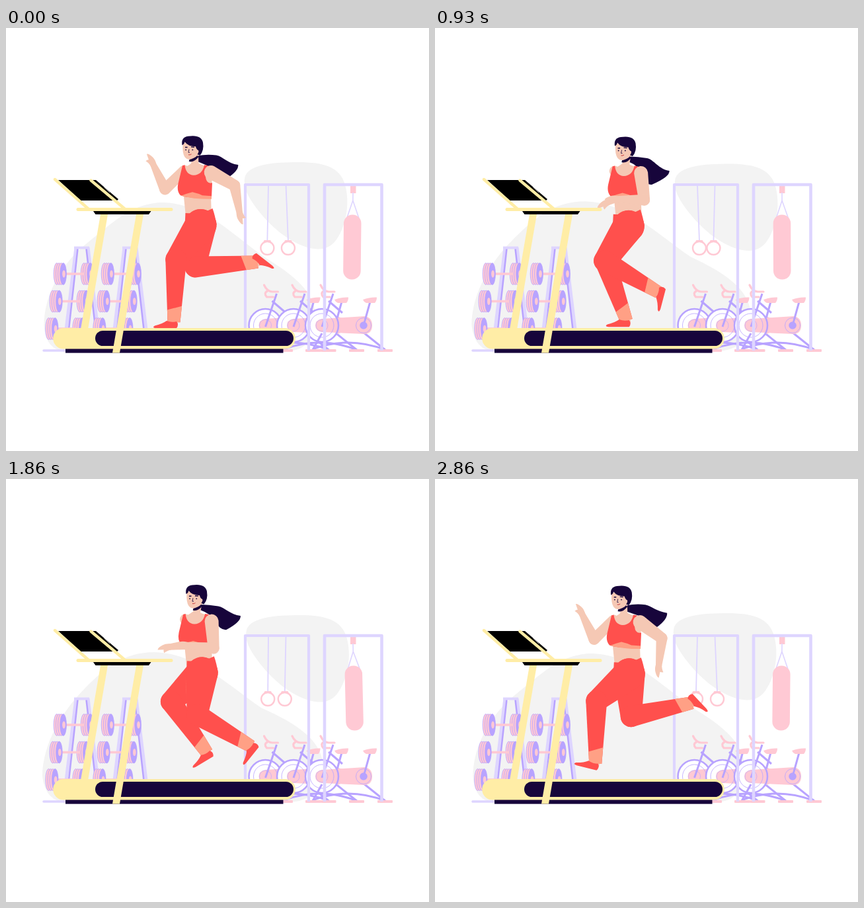
Write an HTML page that moves like this. It is 640 px wide and 640 px high and loops after 2930 ms.

```html
<!DOCTYPE html>
<html lang="en">
<head>
<meta charset="utf-8">
<title>Treadmill run</title>
<style>
html, body { margin: 0; width: 100%; height: 100%; overflow: hidden; background: #fff; }
svg { display: block; width: 100vw; height: 100vh; }
</style>
</head>
<body>
<svg id="stage" viewBox="0 0 640 640"></svg>
<script>
const LOOP = 2930, STEPS = 41, STRIDE = LOOP / 2;
const RED = '#ff504d', PEACH = '#ffa085', SKIN = '#f5c8b4', NAVY = '#17053b', PINK = '#ffc9d4',
  VIOLET = '#b8a3ff', LILAC = '#ded5ff', CREAM = '#ffeda6', GREY = '#f3f3f3';
const { sin, cos, acos, atan2, hypot, max, min, PI } = Math;
const stage = document.getElementById('stage');

// ---------- markup helpers ----------
const path = (d, fill, extra = '') => `<path d="${d}" fill="${fill}" ${extra}/>`;
const line = (d, color, w, cap = 'butt') =>
  `<path d="${d}" fill="none" stroke="${color}" stroke-width="${w}" stroke-linecap="${cap}" stroke-linejoin="round"/>`;
const rect = (x, y, w, h, r, fill) => `<rect x="${x}" y="${y}" width="${w}" height="${h}" rx="${r}" fill="${fill}"/>`;
const ring = (x, y, r, color, w) => `<circle cx="${x}" cy="${y}" r="${r}" fill="none" stroke="${color}" stroke-width="${w}"/>`;
const dot = (x, y, r, fill) => `<circle cx="${x}" cy="${y}" r="${r}" fill="${fill}"/>`;

// ---------- scenery ----------
function rackFrame(x) {
  return line(`M${x + 3} 332L${x - 12} 456M${x + 21} 332L${x + 36} 456`, LILAC, 5) +
    line(`M${x + 5.5} 334L${x - 8} 456M${x + 18.5} 334L${x + 32.5} 456`, VIOLET, 2.5) +
    line(`M${x} 332.5H${x + 23}`, LILAC, 4);
}
function plates(x, y) {
  let s = '';
  for (let i = 0; i < 4; i++) {
    s += `<ellipse cx="${x + 5 + i * 3.2}" cy="${y}" rx="4.8" ry="16.5" fill="${i < 3 ? PINK : VIOLET}" stroke="${VIOLET}" stroke-width=".8"/>`;
  }
  return s + `<ellipse cx="${x + 15.5}" cy="${y}" rx="2.3" ry="5.5" fill="${PINK}"/>`;
}
function dumbbell(x, y) {
  return plates(x + 41, y) + line(`M${x + 16} ${y}H${x + 46}`, PINK, 3.6) + plates(x, y);
}
function bike(x) {
  return `<g transform="translate(${x})">` +
    dot(478, 450, 24.5, '#fff') +
    line('M464 487L478 462M540 460L575 488M466 485Q520 466 574 487', VIOLET, 3) +
    path('M478 440L543 436Q554 438 554 450Q554 462 543 463L478 460Q468 458 468 450Q468 442 478 440Z', PINK) +
    ring(478, 450, 25, VIOLET, 2.6) + ring(478, 450, 18, VIOLET, .8) + ring(478, 450, 9, VIOLET, .6) +
    line('M495 402L478 452M488 413L509 431M541 450L551 414', VIOLET, 3) +
    path('M540 411Q550 407 561 407.5Q561 413 558 416H545Q541 414 540 411Z', PINK) +
    line('M476 389Q480 398 488 399H497M490 407H480Q475 401 481 398', PINK, 3.2, 'round') +
    ring(541, 450, 11.5, VIOLET, .8) + dot(541, 450, 5.8, VIOLET) +
    rect(453, 486, 24, 4, 1, PINK) + rect(562, 486, 23, 4, 1, PINK) + '</g>';
}
function scenery() {
  let weights = '';
  for (let row = 0; row < 3; row++) {
    for (const x of [72, 144]) weights += dumbbell(x - row * 6.2, 372 + row * 41.5);
  }
  return path('', GREY, 'id="hill"') +
    path('M361 228C364 206 405 203 443 203C488 203 506 214 513 237C521 266 514 300 500 320C490 335 474 337 456 332C425 322 401 300 384 279C367 258 359 243 361 228Z', GREY, 'id="cloud"') +
    line('M57 488H92', LILAC, 3.5, 'round') + rackFrame(103) + rackFrame(176) + weights +
    bike(-85.5) + bike(-43) + bike(0) +
    line('M362 488V237H458V488', LILAC, 4.2) + '<g id="ringA"></g><g id="ringB"></g>' +
    rect(521, 238, 8.5, 12, 0, PINK) +
    '<g id="bag">' + line('M525 249V261L515 291M525 261L535.5 291', LILAC, 1.6) +
    rect(511.5, 282.5, 26.5, 98, 13, PINK) + '</g>' +
    line('M482 488V237H568.5V488', LILAC, 4.6);
}
function treadmill() {
  return path('M132 277H219.5L216 282H135.5Z', '#000') +
    path('M79 230H136L170 259L168 261H113Z', '#000') +
    line('M148.5 241L157 249', '#fff', .7) +
    line('M74 229L125 274M128.5 230.5L179 273', CREAM, 4.4, 'round') +
    line('M109 274.5H250', CREAM, 5, 'round') +
    path('M143 282H154L124 456H113Z', CREAM) +
    rect(90, 485, 329.5, 6.6, 0, NAVY) +
    path('M87 454H422A15.7 15.7 0 0 1 422 485.5H87A15.7 15.7 0 0 1 87 454Z', CREAM) +
    rect(135, 458, 300, 23, 11.5, NAVY) +
    path('M197 282H208L172 491.5H161Z', CREAM);
}
const HEAD = line('M277 200Q283 202 289 194', NAVY, 5) +
  path('M267 176Q266 190 270 196Q274 201 280 199Q288 196 289 193Q295 193 295 187Q292 172 280 169Z', SKIN) +
  path('M266 178Q264 166 275 164.5Q295 161.5 297.5 174Q299.5 186 293 193.5L289 192Q293 186 289 185Q287 183 286.5 180Q275 180 270 173Q269 177 266 178Z', NAVY) +
  line('M270.5 181.2H274M279.5 180.6L284.5 181', NAVY, 1.4) +
  dot(271.6, 185, .9, NAVY) + dot(281.8, 185, .9, NAVY) +
  line('M276.5 184L275.5 189H277.5', NAVY, .8) + line('M275.5 192.5Q278 193 280 191.5', '#c8393c', 1);
const BODY = path('M266 213Q275 210 281 205H291Q297 209 306 210Q312 214 312 226L310 256L311 285Q290 292 272 286L269 256L262 240Z', SKIN);
const TOP = path('M267 209L260.5 236Q258 248 264 254Q278 259 311 257.5L312 235Q303 237 302 226Q301 215 306 209L300 208Q297 223 284 223.5Q272 223 270.5 208Z', RED) +
  path('M265 254.5Q274 251 282 249Q291 251 297 254L311 255V259.5Q285 260 265 254.5Z', PEACH);
const SHOE = 'M4 -1Q8 4 4 9.3L-27 9.3Q-34 8.5 -29 5.5Q-18 3 -11 -2Q-4 1 4 -1Z';
const HAND = 'M-3 -4.5Q4 -5 8 -8Q9 -5 8 -3L17 -2Q17 1 9 4Q4 6 -3 4.5Z';

// ---------- runner parts, back to front ----------
const part = (id, fill) => path('', fill, `id="${id}"`);
const legParts = k => part(k + 'Thigh', RED) + part(k + 'Shin', RED) + `<circle id="${k}Ankle" r="6.3" fill="${SKIN}"/>` +
  part(k + 'Cuff', PEACH) + path(SHOE, RED, `id="${k}Shoe"`);
const armParts = k => part(k + 'Upper', SKIN) + part(k + 'Fore', SKIN) + path(HAND, SKIN, `id="${k}Hand"`);
stage.innerHTML = scenery() + part('tail', NAVY) + armParts('far') +
  `<path id="neck" stroke="${SKIN}" stroke-width="11"/>` + `<g id="body">${BODY}</g>` +
  legParts('far') + part('foldFar', PEACH) + part('waist', RED) + legParts('near') + part('foldNear', PEACH) +
  `<g id="top">${TOP}</g><g id="head">${HEAD}</g>` + armParts('near') + treadmill();

const el = {};
stage.querySelectorAll('[id]').forEach(n => el[n.id] = n);
const set = (id, name, v) => el[id].setAttribute(name, v);

// ---------- rhythm ----------
const angle = p => 2 * PI * p / STRIDE;
const bob = (p, low) => cos(2 * angle(p - low));             // two bounces per stride
const bump = (p, peak) => max(0, cos(angle(p - peak))) ** 10; // one short swell per stride

// Path of one foot from landing: time, ankle x, ankle y, shoe turn
const STEP = [
  [0, 254, 445, 0], [138, 290, 443, 0], [313, 311, 432, -12], [395, 372, 404, -52], [570, 390, 339, -123],
  [672, 381, 354, -142], [930, 338, 400, -75], [1105, 290, 417, -17], [1243, 212, 417, 33], [1395, 243, 431, 14]
];
const FAR_LAG = STRIDE / 2 + 60;
// smooth closed curve through the keys
function footAt(time) {
  const p = (time % STRIDE + STRIDE) % STRIDE, n = STEP.length;
  const key = i => STEP[(i + n) % n];
  const at = i => key(i)[0] + Math.floor(i / n) * STRIDE;
  let i = n - 1;
  while (STEP[i][0] > p) i--;
  const h = at(i + 1) - at(i), u = (p - at(i)) / h, w = 1 - u;
  return [1, 2, 3].map(a => {
    const slope = j => (key(j + 1)[a] - key(j - 1)[a]) / (at(j + 1) - at(j - 1));
    return key(i)[a] * (1 + 2 * u) * w * w + slope(i) * h * u * w * w +
      key(i + 1)[a] * u * u * (3 - 2 * u) - slope(i + 1) * h * u * u * w;
  });
}

// ---------- geometry ----------
const fix = (...a) => a.map(n => n.toFixed(2)).join(' ');
const add = (a, x, y) => [a[0] + x, a[1] + y];
const polar = (a, r, turn) => add(a, r * cos(turn), r * sin(turn));
// middle joint of a two-bone limb; side +1 bends like a knee, -1 like an elbow
function joint(a, b, la, lb, side) {
  const dx = b[0] - a[0], dy = b[1] - a[1], d = hypot(dx, dy);
  const c = (la * la + d * d - lb * lb) / (2 * la * d);
  return polar(a, la, atan2(dy, dx) + side * acos(max(-1, min(1, c))));
}
// point at share u along a-b, offset sideways by r
function beside(a, b, u, r) {
  const dx = b[0] - a[0], dy = b[1] - a[1], l = hypot(dx, dy) || 1;
  return [a[0] + dx * u - dy / l * r, a[1] + dy * u + dx / l * r];
}
function taper(a, b, r, s, flat) {
  const at = (u, k) => fix(...beside(a, b, u, k));
  const end = flat ? 'L' : `A${s} ${s} 0 0 0 `;
  return `M${at(0, r)}L${at(1, s)}${end}${at(1, -s)}L${at(0, -r)}A${r} ${r} 0 0 0 ${at(0, r)}Z`;
}
const lens = (a, b, w) => w < .3 ? '' : `M${fix(...a)}L${fix(...b)}Q${fix(...beside(a, b, .5, w))} ${fix(...a)}Z`;

// ---------- runner ----------
function drawLeg(k, p, hip) {
  const [x, y, turn] = footAt(p), ankle = [x, y], knee = joint(hip, ankle, 64, 95, 1);
  const at = (u, side) => fix(...beside(knee, ankle, u, side * (16 - 6.5 * u)));
  set(k + 'Thigh', 'd', taper(hip, knee, 24, 16));
  set(k + 'Shin', 'd', taper(knee, ankle, 16, 9.5, true));
  set(k + 'Cuff', 'd', `M${at(.81, 1)}L${at(1, 1)}L${at(1, -1)}L${at(.74, -1)}Z`);
  set(k + 'Ankle', 'cx', x);
  set(k + 'Ankle', 'cy', y);
  const heel = max(0, -turn / 24);
  set(k + 'Shoe', 'transform', `translate(${fix(x, y)}) rotate(${fix(turn)}) translate(${fix(heel)} 0)`);
  return knee;
}
function drawArm(k, shoulder, reach, degrees, r) {
  const wrist = polar(shoulder, reach, degrees * PI / 180), elbow = joint(shoulder, wrist, 41, 43, -1);
  const turn = atan2(wrist[1] - elbow[1], wrist[0] - elbow[0]) * 180 / PI;
  set(k + 'Upper', 'd', taper(shoulder, elbow, r, 8.5));
  set(k + 'Fore', 'd', taper(elbow, wrist, 8.5, 4.5));
  set(k + 'Hand', 'transform', `translate(${fix(...wrist)}) rotate(${fix(turn)})`);
}
function drawTail(p, head) {
  const sway = bob(p, 197), root = add(head, 289, 194), base = add(head, 287, 202);
  const crest = [318 + head[0] * .5, 193 + sway * 4];
  const tip = [351 + head[0] * .6, 208 + sway * 8];
  const end = [333 - sway * 5, tip[1] + 21];
  set('tail', 'd', `M${fix(...root)}Q${fix(crest[0] - 14, crest[1] - 2, ...crest)}` +
    `C${fix(crest[0] + 10, crest[1] + 2, tip[0] - 16, tip[1] - 2, ...tip)}` +
    `Q${fix(tip[0] + 1, tip[1] + 9, ...end)}Q${fix(end[0] - 10, end[1] + 1, end[0] - 17, end[1] - 13)}` +
    `Q${fix(base[0] + 17, base[1] + 6, ...base)}Z`);
}
function drawRunner(p) {
  const c = cos(angle(p)), s = sin(angle(p)), drop = 3 * bob(p, 130) - 2;
  const hip = [294.5 + 2.3 * s, 299 + 1.5 * drop];
  const body = [1 - c, drop], head = [4.5 - 4 * c + 1.5 * s, drop];
  const shift = v => `translate(${fix(...v)})`;
  set('body', 'transform', shift(body));
  set('top', 'transform', shift(body));
  set('head', 'transform', shift(head));
  set('neck', 'd', `M${fix(286 + body[0], 213 + body[1])}L${fix(285 + head[0], 190 + head[1])}`);
  const pt = (dx, dy) => fix(...add(hip, dx, dy));
  set('waist', 'd', `M${pt(-23, -18)}Q${pt(2, -16)} ${pt(18, -25)}Q${pt(22, -14)} ${pt(24, 0)}L${pt(-24, 2)}Z`);

  drawLeg('far', p - FAR_LAG, hip);
  const knee = drawLeg('near', p, hip);
  set('foldNear', 'd', lens(add(hip, 16, 18), add(knee, 14, 10), -7 * bump(p, 1330)));
  set('foldFar', 'd', lens(add(hip, -25, 5), add(hip, -23, 46), 8 * bump(p, 570)));

  const nearSwing = 118 - 63 * c + 8 * s - 20 * sin(2 * angle(p));
  drawArm('near', add(body, 310, 219), 76 - .27 * (nearSwing - 55), nearSwing, 10.5);
  drawArm('far', add(body, 270, 216), 49, 135 + 57 * c - 8 * s, 8);
  drawTail(p, head);
}

// ---------- slow background sway ----------
const wave = (t, peak) => cos(2 * PI * (t - peak) / LOOP);
function drawRing(id, top, x) {
  el[id].innerHTML = line(`M${top} 238L${fix(x)} 322`, LILAC, 1.8) + ring(fix(x), 333, 10, PINK, 2.4) +
    line(`M${fix(x - 4)} 322.5H${fix(x + 4)}`, PINK, 3, 'round');
}
function drawSway(t) {
  const w = (1 - wave(t, 0)) / 2;
  const left = 57.5 - 3 * w, crest = 238 - 16 * w, top = 264 - 2.5 * w, right = 468 + 14 * w;
  set('hill', 'd', `M${fix(left, 450)}C${fix(left, 400, left + 31, 352, 122 - 10 * w, 326 - 4 * w)}` +
    `C${fix(crest - 78, 296 - 10 * w, crest - 48, top, crest, top)}` +
    `C${fix(crest + 62, top + 2, crest + 104, 312 - 7 * w, 390 - 5 * w, 346)}` +
    `C${fix(right - 38, 371, right - 5, 394, right, 430)}Q${fix(right + 2, 488, 425, 489)}H92Q60 489 ${fix(left, 450)}Z`);
  set('cloud', 'transform', `translate(${fix(3 * w, 3.5 * w)})`);
  drawRing('ringA', 397, 397 + 3 * wave(t, 1000));
  drawRing('ringB', 423.5, 423.5 + 3.5 * wave(t, -100));
  const swing = .7 + 2.4 * wave(t, 1700);
  set('bag', 'transform', `rotate(${fix(-swing / 125 * 180 / PI)} 525 249)`);
}

// the motion advances in even steps
function draw(ms) {
  const t = Math.floor(ms / LOOP * STEPS + .1) % STEPS * LOOP / STEPS;
  drawSway(t);
  drawRunner(t % STRIDE);
}
let start = null;
function tick(now) {
  if (start === null) start = now;
  draw(max(0, now - start));
  requestAnimationFrame(tick);
}
draw(0);
requestAnimationFrame(tick);
</script>
</body>
</html>
```
